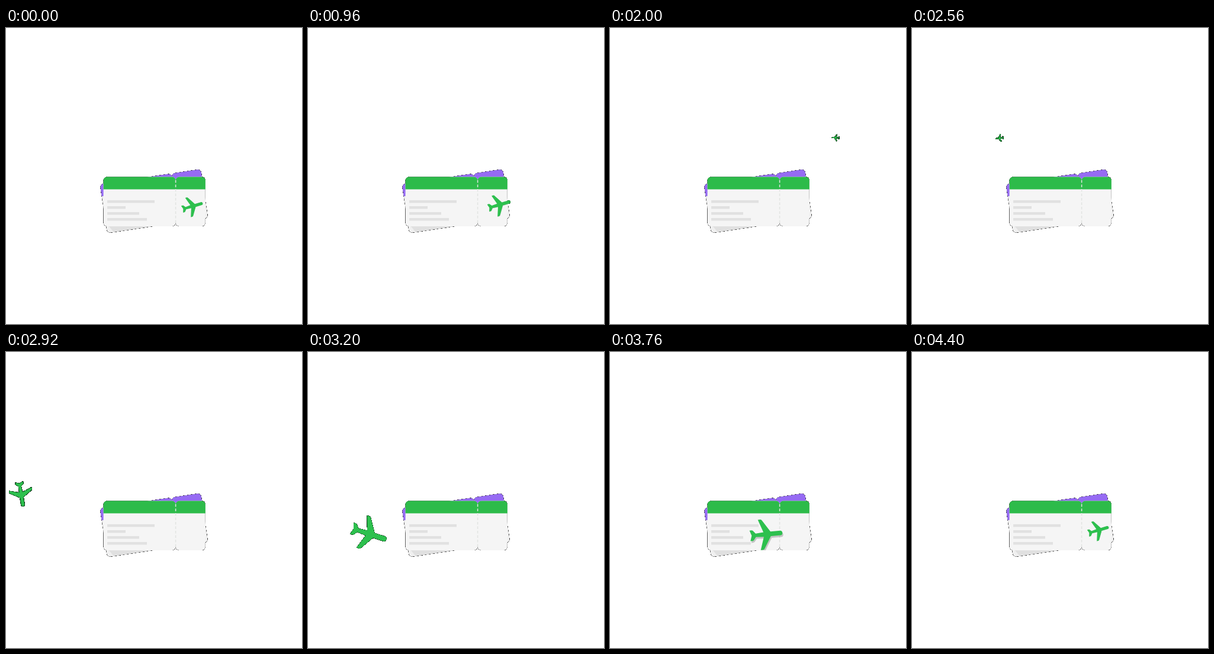
These frames come from a looping animation (500 by 500 pixels, 7000 ms). An HTML page:

```html
<!DOCTYPE html>
<html lang="en">
<head>
<meta charset="utf-8">
<title>Flight tickets</title>
<style>
  html, body { margin: 0; width: 100%; height: 100%; overflow: hidden; background: #fff; }
  svg { display: block; width: 100%; height: 100%; }
</style>
</head>
<body>
<svg viewBox="0 0 500 500">
  <defs>
    <!-- Hard-edged silhouette: partly covered border pixels darken towards black -->
    <filter id="edge" filterUnits="userSpaceOnUse" x="0" y="0" width="500" height="500" color-interpolation-filters="sRGB">
      <feColorMatrix result="mask" values="0 0 0 0 0  0 0 0 0 0  0 0 0 0 0  0 0 0 40 -5"/>
      <feComposite in="SourceGraphic" in2="mask" operator="in" result="art"/>
      <feMerge><feMergeNode in="mask"/><feMergeNode in="art"/></feMerge>
    </filter>
    <clipPath id="card">
      <rect x="164.6" y="251.4" width="122" height="83.6" rx="6"/>
      <rect x="286.6" y="251.4" width="50.2" height="83.6" rx="6"/>
    </clipPath>
    <path id="plane" d="M24-4C29-4 29 4 24 4L7.5 4L-5 24Q-6 26-8 26L-12 26L-4.5 4L-18 3L-22.5 8.5Q-24 9.5-28 9L-25 0L-28-9Q-24-9.5-22.5-8.5L-18-3L-4.5-4L-12-26L-8-26Q-6-26-5-24L7.5-4Z"/>
    <path id="route" d="M315 301C390 279 470 260 470 222C470 196 420 187 373 185C300 181 205 178 140 187C70 193 25 196 25 233C25 265 60 292 99.5 306C150 324 210 312 263 308C283 306 300 305.5 315 301"/>
  </defs>
  <g filter="url(#edge)">
    <g id="back">
      <g clip-path="url(#card)">
        <path fill="#f0f0f0" d="M160 245h180v95H160z"/>
        <path fill="#966bf3" d="M160 245h180v27H160z"/>
        <path transform="rotate(8.5 250.7 293)" fill="#e0e0e0" d="M172 333L184 347L260 347L260 330Z"/>
      </g>
    </g>
    <g id="front">
      <g clip-path="url(#card)">
        <path fill="#f5f5f5" d="M160 245h180v95H160z"/>
        <path fill="#2dbb4a" d="M160 245h180v27.6H160z"/>
      </g>
      <path stroke="#e1e1e1" stroke-width="4.4" d="M171 293.2h80M171 303.2h31M171 313.2h54M171 323.2h67"/>
      <path stroke="#e2e5e2" stroke-width="1.5" stroke-dasharray="4.5 3" d="M286.6 257V332"/>
      <g clip-path="url(#card)"><use id="shadow" href="#plane" fill="#000" fill-opacity=".2"/></g>
    </g>
    <use id="flyer" href="#plane" fill="#2dc04e"/>
  </g>
</svg>
<script>
const LOOP = 7000, STEP = 40, TAKEOFF = 770, FLIGHT = 3470;
const REST_SIZE = .65, FAR_SIZE = .2, NEAR_SIZE = 1.1;

const route = document.getElementById("route");
const length = route.getTotalLength();
const clamp = v => Math.min(1, Math.max(0, v));
const ease = u => u * u * (3 - 2 * u);
const place = (id, transform) => document.getElementById(id).setAttribute("transform", transform);

function flight(t) {
  const s = length * ease(clamp((t - TAKEOFF) / FLIGHT));
  const { x, y } = route.getPointAtLength(s);
  const a = route.getPointAtLength(Math.max(0, s - 1));
  const b = route.getPointAtLength(Math.min(length, s + 1));
  const heading = Math.atan2(b.y - a.y, b.x - a.x) * 180 / Math.PI;

  // Lower on the stage is nearer; close to its slot the plane settles to rest size
  const depth = Math.max(0, (y - 185) / 121) ** .63;
  const airSize = FAR_SIZE + (NEAR_SIZE - FAR_SIZE) * depth;
  const lift = clamp(Math.min(s, length - s) / 70);
  return { x, y, heading, lift, size: REST_SIZE + (airSize - REST_SIZE) * lift };
}

// Tickets recoil briefly as the plane takes off
const recoil = t => Math.sin(Math.PI * clamp((t - 960) / 740)) ** 2;

function draw(ms) {
  const t = Math.floor(ms % LOOP / STEP) * STEP;
  const { x, y, heading, lift, size } = flight(t);
  const pose = (dx, dy) => `translate(${x + dx} ${y + dy}) rotate(${heading}) scale(${size})`;
  const kick = recoil(t);

  place("flyer", pose(0, 0));
  place("shadow", pose(2 * lift, 4 * lift));
  place("front", `translate(${-.9 * kick} ${-.4 * kick}) rotate(${.5 * kick} 250.7 293)`);
  place("back", `translate(-.7 -.7) rotate(${-8.5 + .6 * kick} 250.7 293)`);
}

const origin = performance.now();
function tick() {
  draw(performance.now() - origin);
  requestAnimationFrame(tick);
}
tick();
</script>
</body>
</html>
```
